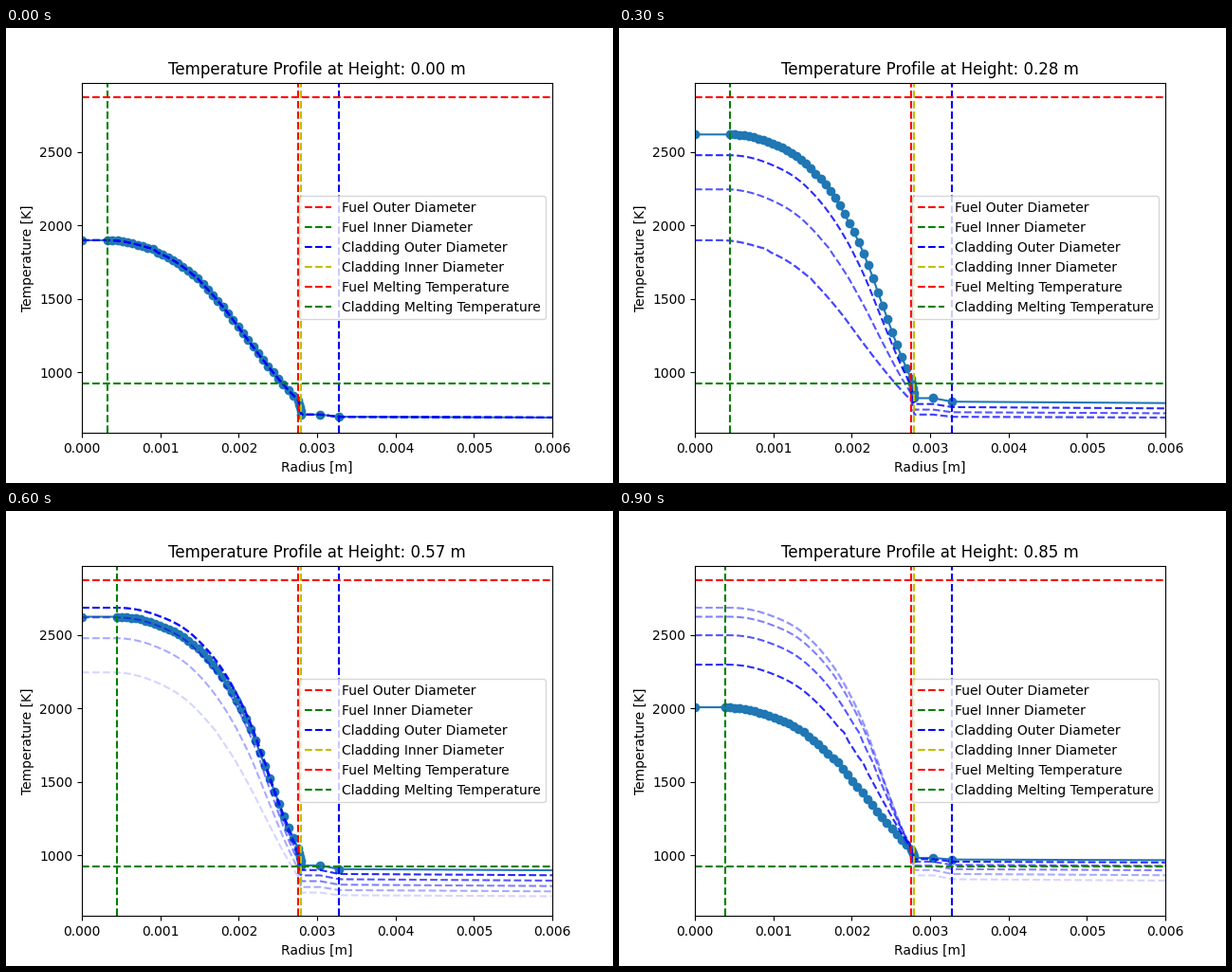
Recreate the animation shown at these times as a matplotlib script. Size 640 by 480 pixels, loop 1 s.

```python
import numpy as np
import matplotlib.pyplot as plt
from matplotlib.animation import FuncAnimation

FRAMES, INTERVAL, TRAIL = 10, 100, 5
HEIGHTS = np.linspace(0, 0.85, FRAMES)

# Radii in metres, temperatures in kelvin
FUEL_OUTER, CLAD_INNER, CLAD_OUTER, COOLANT_R = 0.00276, 0.0028, 0.00328, 0.007
FUEL_MELT, CLAD_MELT = 2873, 925
COLD_PEAK, HOT_PEAK = 1899, 2685

# Relative fuel temperature from the inner to the outer radius
DEPTH = np.linspace(0, 1, 39)
KNOTS = np.array([0, 8, 16, 24, 28, 32, 36, 38]) / 38
COLD = np.array([1, .950, .811, .545, .376, .213, .065, 0])
HOT = np.array([1, .972, .886, .687, .527, .309, .092, 0])


def along_rod(n, *values):
    """Polynomial through values at five key steps up the rod."""
    keys = np.array([0, 2, 4, 7, 9]) / 9
    return np.polyval(np.polyfit(keys, values, 4), n / 9)


def smooth(x, xs, ys):
    """Cubic Hermite curve through the knots, flat at the start."""
    slopes = np.gradient(ys, xs)
    slopes[0] = 0
    i = np.clip(np.searchsorted(xs, x, side="right") - 1, 0, len(xs) - 2)
    h = xs[i + 1] - xs[i]
    t = (x - xs[i]) / h
    return ((1 + 2 * t) * (1 - t) ** 2 * ys[i] + t * (1 - t) ** 2 * h * slopes[i]
            + t ** 2 * (3 - 2 * t) * ys[i + 1] + t ** 2 * (t - 1) * h * slopes[i + 1])


def fuel_inner(n):
    return along_rod(n, .327, .435, .448, .444, .387) * 1e-3


def profile(n):
    peak = along_rod(n, COLD_PEAK, 2478, HOT_PEAK, 2498, 2008)
    surface = along_rod(n, 809, 906, 996, 1054, 1041)
    clad_in = along_rod(n, 713, 785, 864, 957, 983)
    clad_out = along_rod(n, 698, 764, 838, 935, 972)
    coolant = along_rod(n, 691, 752, 825, 926, 966)

    heat = (peak - COLD_PEAK) / (HOT_PEAK - COLD_PEAK)
    shape = smooth(DEPTH, KNOTS, COLD + heat * (HOT - COLD))
    fuel_t = surface + (peak - surface) * shape
    # Conductivity steps at the borders of the restructured fuel zones
    for border in (1820, 1610):
        above = fuel_t - border
        fuel_t = fuel_t + np.where(above > 0, 18 * np.exp(-np.abs(above) / 20), 0)

    fuel_r = np.linspace(fuel_inner(n), FUEL_OUTER, len(DEPTH))
    gap_r = np.linspace(FUEL_OUTER, CLAD_INNER, 5)[1:]
    gap_t = np.linspace(surface, clad_in, 5)[1:]
    clad_r = [(CLAD_INNER + CLAD_OUTER) / 2, CLAD_OUTER, COOLANT_R]
    return (np.concatenate([[0], fuel_r, gap_r, clad_r]),
            np.concatenate([[peak], fuel_t, gap_t, [clad_in, clad_out, coolant]]))


fig, ax = plt.subplots(figsize=(6.4, 4.8), dpi=100)


def update(n):
    ax.clear()
    ax.plot(*profile(n), marker="o")

    # The history starts out filled with the first profile
    for age in range(TRAIL, 0, -1):
        ax.plot(*profile(max(n - age, 0)), "b--", alpha=1 - age / (TRAIL + 1))

    for r, color, label in [
        (FUEL_OUTER, "r", "Fuel Outer Diameter"),
        (fuel_inner(n), "g", "Fuel Inner Diameter"),
        (CLAD_OUTER, "b", "Cladding Outer Diameter"),
        (CLAD_INNER, "y", "Cladding Inner Diameter"),
    ]:
        ax.axvline(r, color=color, linestyle="--", label=label)
    ax.axhline(FUEL_MELT, color="r", linestyle="--", label="Fuel Melting Temperature")
    ax.axhline(CLAD_MELT, color="g", linestyle="--", label="Cladding Melting Temperature")

    ax.set(xlim=(0, 0.006), ylim=(588, 2972),
           xlabel="Radius [m]", ylabel="Temperature [K]",
           title=f"Temperature Profile at Height: {HEIGHTS[n]:.2f} m")
    ax.legend(loc="center right")


anim = FuncAnimation(fig, update, frames=FRAMES, interval=INTERVAL, repeat=True)
plt.show()
```
